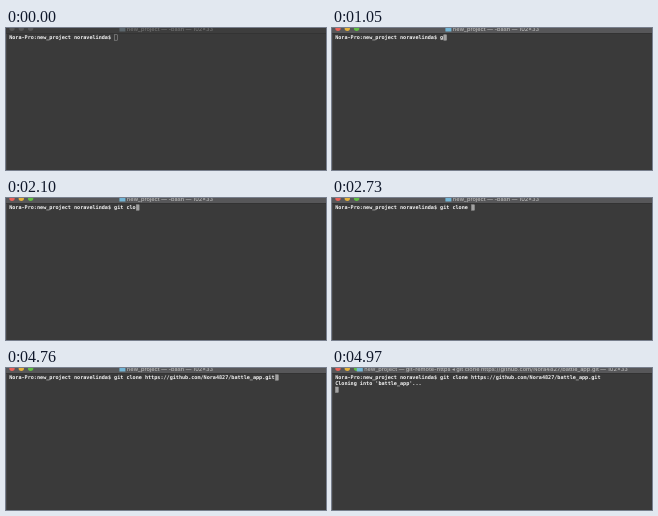
An HTML page that plays this animation: 320 by 142 pixels, repeating every 5.11 s.

```html
<!DOCTYPE html>
<html lang="en">
<head>
<meta charset="utf-8">
<title>Terminal</title>
<style>
  html, body { margin: 0; width: 100%; height: 100%; overflow: hidden; background: #3a3a3a; }
  svg { display: block; width: 100%; height: 100%; }
  text { text-rendering: geometricPrecision; white-space: pre; }
  .bar { fill: #575759; }
  .edge { fill: #2c2c2c; }
  .side { fill: #505050; }
  .title { font: 500 5.65px Inter, Roboto, sans-serif; fill: #b8b8b8; text-anchor: middle; }
  .folder { fill: #74b6d6; }
  .red { fill: #ec625a; }
  .yellow { fill: #e6b23c; }
  .green { fill: #62c043; }
  .shell text { font: bold 5.137px "DejaVu Sans Mono", monospace; fill: #f4f4f4; }
  .cursor { fill: #a2a2a2; stroke: #a2a2a2; stroke-width: .5; }

  .inactive .bar { fill: #3d3d3d; }
  .inactive .title { fill: #737373; }
  .inactive .folder { fill: #5c666c; }
  .inactive circle { fill: #575757; }
  .inactive .cursor { fill: none; }
</style>
</head>
<body>
<svg id="window" class="inactive" viewBox="0 0 320 142" preserveAspectRatio="none">
  <rect class="side" width=".7" height="142"/>
  <rect class="bar" width="320" height="5"/>
  <rect class="edge" y="5" width="320" height=".5"/>
  <circle class="red" cx="6" cy=".3" r="2.7"/>
  <circle class="yellow" cx="15.3" cy=".3" r="2.7"/>
  <circle class="green" cx="24.6" cy=".3" r="2.7"/>
  <path id="folder" class="folder" d="M0-1.5h2l.7.7h3.3v4.4h-6z"/>
  <text id="title" class="title" x="164" y="2.7"></text>
  <g class="shell">
    <rect id="cursor" class="cursor" width="2.8" height="5.4"/>
    <text id="command" x="3.2" y="11.2"></text>
    <text id="output" x="3.2" y="17.3"></text>
  </g>
</svg>
<script>
  const LOOP = 5110, LEFT = 3.2, TOP = 6.6, COLUMN = 3.093, ROW = 6.1;
  const PROMPT = 'Nora-Pro:new_project noravelinda$ ';
  const URL_TEXT = 'https://github.com/Nora4827/battle_app.git';
  const COMMAND = 'git clone ' + URL_TEXT;

  // Time of each keystroke; the address is then pasted at once.
  const KEYS = [1050, 1120, 1260, 1330, 1890, 1960, 2100, 2310, 2380, 2730];
  const FOCUS = 210, PASTE = 3780, ENTER = 4830, REPLY = 4900, RETITLE = 4970;

  const $ = id => document.getElementById(id);
  const [win, folder, title, cursor, command, output] =
    ['window', 'folder', 'title', 'cursor', 'command', 'output'].map($);

  function setText(node, value) {
    if (node.textContent !== value) node.textContent = value;
  }

  function draw(now) {
    const t = now % LOOP;
    const typed = t >= PASTE ? COMMAND.length : KEYS.filter(k => t >= k).length;
    const line = PROMPT + COMMAND.slice(0, typed);
    const row = t >= REPLY ? 2 : t >= ENTER ? 1 : 0;
    const job = t >= RETITLE ? 'git-remote-https ◂ git clone ' + URL_TEXT : '-bash';

    win.classList.toggle('inactive', t < FOCUS);
    setText(command, line);
    setText(output, t >= REPLY ? "Cloning into 'battle_app'..." : '');
    setText(title, `new_project — ${job} — 102×33`);

    const column = row ? 0 : line.length;
    cursor.setAttribute('x', LEFT + column * COLUMN + .3);
    cursor.setAttribute('y', TOP + row * ROW + .2);
    const titleLeft = 164 - title.getComputedTextLength() / 2;
    folder.setAttribute('transform', `translate(${titleLeft - 7.4} 0)`);
  }

  let start;
  function tick(now) {
    start ??= now;
    draw(now - start);
    requestAnimationFrame(tick);
  }
  draw(0);
  requestAnimationFrame(tick);
</script>
</body>
</html>
```
